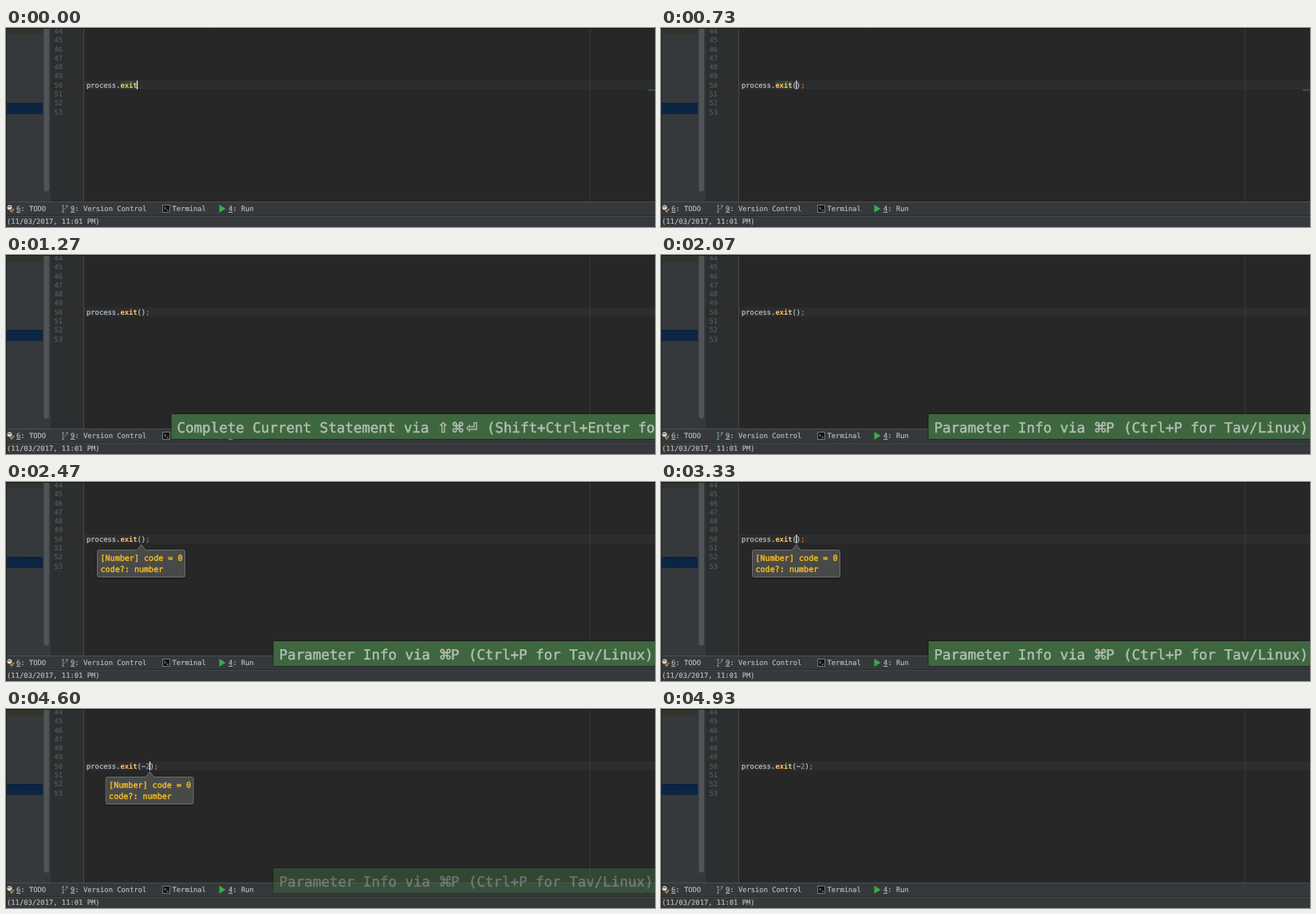
Write an HTML page that moves like this. It is 814x250 px and loops after 5000 ms.

```html
<!DOCTYPE html>
<html lang="en">
<head>
<meta charset="utf-8">
<title>Editor shortcuts</title>
<style>
  html, body { margin: 0; width: 100%; height: 100%; overflow: hidden; background: #272727; }
  svg { display: block; }
  text { font-family: "DejaVu Sans Mono", monospace; font-size: 8.8px; fill: #bfbfbf; stroke: #bfbfbf; stroke-width: .15px; white-space: pre; text-rendering: geometricPrecision; }
  #lines text { fill: #5f6264; stroke: none; }
  #code { fill: #b4c0ce; stroke: #b4c0ce; stroke-width: .25px; }
  #code .name { fill: #ffc66d; stroke: none; font-weight: bold; }
  #digit { fill: #6897bb; stroke: #6897bb; }
  #semi { fill: #cc7832; stroke: #cc7832; }
  .key { text-decoration: underline; }
  .hint text { font-size: 17.5px; fill: #b3bfb3; stroke: #b3bfb3; stroke-width: .45px; }
  .hint .sym { font-family: "DejaVu Sans", sans-serif; }
  .hint rect { fill: #3e673f; filter: drop-shadow(0 0 1px #000a); }
  #popup path { filter: drop-shadow(0 1px 1px #0008); }
  #popup text { font-size: 10.07px; fill: #ffc120; stroke: #ffc120; stroke-width: .35px; }
</style>
</head>
<body>
<svg width="814" height="250" viewBox="0 0 814 250">
  <!-- project panel -->
  <rect width="56" height="218" fill="#35393b"/>
  <rect width="46" height="8" fill="#30342b"/>
  <rect y="94" width="46" height="14" fill="#0c2340"/>
  <path d="M1 97.5H45M2 100.5H45M1 103.5H45M2 106.5H45" stroke="#17417a" stroke-dasharray="2 1.6" opacity=".35"/>
  <rect x="47.5" y="-8" width="6.5" height="213.5" rx="3.2" fill="#505456"/>

  <!-- editor -->
  <rect x="56" width="41" height="218" fill="#2c2f30"/>
  <rect x="56" y="66" width="758" height="11" fill="#2d2d2d"/>
  <path d="M97.5 0V218" stroke="#4a4a4a"/>
  <path d="M732.5 0V218" stroke="#3a3a3a"/>
  <g id="lines"></g>
  <g id="warning">
    <rect x="143.4" y="66" width="21.2" height="11" fill="#344134"/>
    <path d="M805 78.5l1.5-1 1.5 1 1.5-1 1.5 1 1.5-1 1.5 1" fill="none" stroke="#3c963c"/>
  </g>
  <text id="code" x="101" y="74.7">process.<tspan class="name">exit</tspan><tspan id="open"></tspan><tspan id="minus"></tspan><tspan id="digit"></tspan><tspan id="close"></tspan><tspan id="semi"></tspan></text>
  <rect id="caret" y="66" width="1.2" height="11" fill="#f4f4f4"/>

  <!-- tool bar and status line -->
  <rect y="218" width="814" height="32" fill="#35393b"/>
  <path d="M0 218.5H814" stroke="#4b4e50"/>
  <path d="M0 235.5H814" stroke="#27292a"/>
  <path d="M0 236.5H814" stroke="#434648"/>
  <circle cx="4.5" cy="225.5" r="3" fill="#d6d2ca"/>
  <path d="M2 224.5H6" stroke="#5d5148"/>
  <path d="M5.5 229l1.5 2 3-4" fill="none" stroke="#c58a55" stroke-width="1.5"/>
  <g fill="#6689a3">
    <path d="M71.5 223V231M71.5 229C72 226.500 76.500 228 76.500 223.500" fill="none" stroke="#6689a3"/>
    <circle cx="71.5" cy="223.5" r="1.3"/>
    <circle cx="76.5" cy="223.5" r="1.3"/>
    <circle cx="71.5" cy="231" r="1.3"/>
  </g>
  <rect x="196.5" y="222.5" width="9" height="9" fill="#111" stroke="#777"/>
  <path d="M198.5 225l2 1.5-2 1.5M201.500 229H204" fill="none" stroke="#ccc" stroke-width=".8"/>
  <path d="M267.5 222L275.5 227 267.5 232Z" fill="#35ad4b"/>
  <text x="13" y="230"><tspan class="key">6</tspan>: TODO</text>
  <text x="81" y="230"><tspan class="key">9</tspan>: Version Control</text>
  <text x="208.5" y="230">Terminal</text>
  <text x="279" y="230"><tspan class="key">4</tspan>: Run</text>
  <text x="1" y="246">(11/03/2017, 11:01 PM)</text>

  <path d="M0 .5H814" stroke="#191919"/>
  <path d="M.5 0V250" stroke="#242627"/>

  <g id="popup">
    <path d="M116.5 85.5H164.5L169.8 78.5 175 85.5H222.5Q224.5 85.5 224.5 87.5V117.5Q224.5 119.5 222.5 119.5H116.5Q114.5 119.5 114.5 117.5V87.5Q114.5 85.5 116.5 85.5Z" fill="#484a4a" stroke="#6c6f70"/>
    <text x="118.5" y="99">[Number] code = 0</text>
    <text x="118.5" y="113">code?: number</text>
  </g>

  <g id="complete" class="hint">
    <rect x="207.5" y="200" width="610" height="31"/>
    <text x="214.5" y="222.5">Complete Current Statement via</text>
    <text class="sym" x="541" y="222.5">⇧</text>
    <text class="sym" x="558" y="222.5">⌘</text>
    <text class="sym" x="577" y="222.5">⏎</text>
    <text x="603" y="222.5">(Shift+Ctrl+Enter for</text>
  </g>
  <g id="params" class="hint">
    <rect x="335.5" y="200" width="482" height="31"/>
    <text x="342.5" y="222.5">Parameter Info via</text>
    <text class="sym" x="542.5" y="222.5">⌘</text>
    <text x="558" y="222.5">P</text>
    <text x="580" y="222.5">(Ctrl+P for Tav/Linux)</text>
  </g>
</svg>
<script>
const LOOP = 5000, TICK = 1000 / 15, CHAR = 5.298;
const $ = id => document.getElementById(id);
const show = (id, alpha) => $(id).setAttribute("opacity", Math.max(0, Math.min(1, alpha)));
const write = (id, text) => { $(id).textContent = text; };

// Ticks at which the caret switches; it starts visible.
const blinks = [1, 3, 5, 7, 9, 11, 15, 17, 19, 21, 24, 26, 28, 29, 31, 33, 37, 39, 42,
  44, 46, 48, 51, 53, 55, 56, 58, 60, 63, 65, 67, 69, 74];

for (let n = 44; n <= 53; n++) {
  const label = document.createElementNS($("lines").namespaceURI, "text");
  label.setAttribute("x", 60.5);
  label.setAttribute("y", 74.7 + (n - 50) * 11.28);
  label.textContent = n;
  $("lines").append(label);
}

function draw(tick) {
  const completed = tick >= 11, minus = tick >= 55, digit = tick >= 56;
  write("open", completed ? "(" : "");
  write("minus", minus ? "−" : "");
  write("digit", digit ? "2" : "");
  write("close", completed ? ")" : "");
  write("semi", completed ? ";" : "");

  const column = 12 + completed + minus + digit;
  $("caret").setAttribute("x", 100.4 + column * CHAR);
  show("caret", blinks.filter(b => b <= tick).length % 2 ? 0 : 1);
  show("warning", tick < 16 ? 1 : 0);

  show("popup", tick >= 32 && tick < 74 ? 1 : 0);
  $("popup").setAttribute("transform", `translate(${tick >= 59 ? 2 * CHAR : 0})`);
  show("complete", tick < 31 ? (tick - 11) / 6 : 0);
  show("params", tick < 31 ? 0 : (71 - tick) / 4);
}

const start = performance.now();
function frame() {
  const time = (performance.now() - start) % LOOP;
  draw(Math.floor((time + 4) / TICK) % 75);
  requestAnimationFrame(frame);
}
frame();
</script>
</body>
</html>
```
